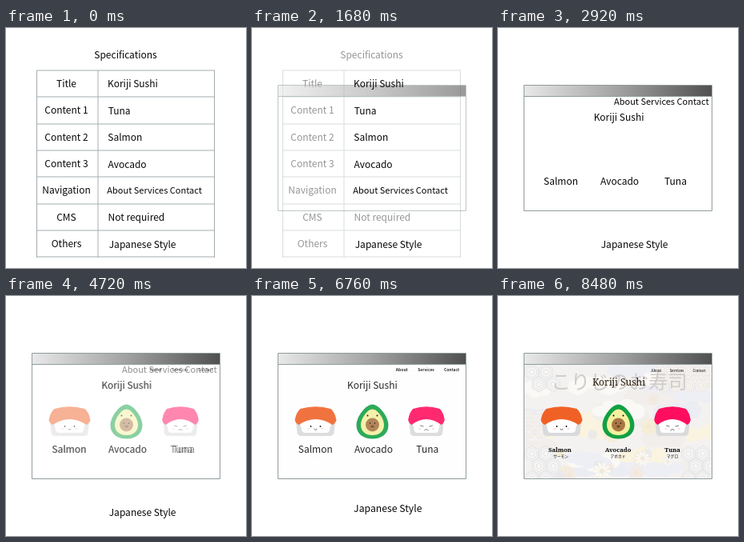
An HTML page that plays this animation: 300 by 300 pixels, repeating every 10 s.

```html
<!DOCTYPE html>
<html lang="en">
<head>
<meta charset="utf-8">
<title>From specification to design</title>
<style>
html, body { margin: 0; width: 100%; height: 100%; overflow: hidden; background: #fff; }
svg { display: block; width: 100%; height: 100%; }
text { font: 12px "Noto Sans CJK JP", "Noto Sans CJK", "Noto Sans", sans-serif; fill: #080808; }
.mid { text-anchor: middle; }
.menu { font-size: 11px; }
.small { font-size: 5px; font-weight: 700; }
.serif { font-family: "Noto Serif", serif; font-weight: 500; }
.title { fill: #2b1e0c; }
.name { font-size: 7.6px; font-weight: 700; }
.link { font-size: 4.5px; }
.kana { font-size: 4.8px; }
.big { font-size: 24.3px; fill: #cfccca; }
</style>
</head>
<body>
<svg viewBox="0 0 300 300" xmlns="http://www.w3.org/2000/svg">
  <defs>
    <linearGradient id="bar">
      <stop offset="0" stop-color="#e8e8e8"/>
      <stop offset=".5" stop-color="#a2a2a2"/>
      <stop offset="1" stop-color="#505050"/>
    </linearGradient>
    <clipPath id="view"><rect x="33" y="86" width="234" height="142"/></clipPath>
    <g id="rice">
      <path d="M-25 15L-23 33Q-22 37-18 37H18Q22 37 23 33L25 15Z" fill="#d9dadb"/>
      <path d="M-21 14L-17 31Q-16 33-13 33H13Q16 33 17 31L21 14Z" fill="#fff"/>
    </g>
    <path id="fish" d="M-26 17Q-24 7-19 3Q0-2.500 19 3Q24 7 26 17Q25 21 21 23Q0 9-21 23Q-25 21-26 17Z"/>
    <g id="dishes">
      <g transform="translate(79.5 138)">
        <use href="#rice"/><use href="#fish" fill="#f06126"/>
        <circle cx="-6" cy="25" r=".9"/><circle cx="6" cy="25" r=".9"/>
        <path d="M-2 28Q0 31 2 28" fill="none" stroke="#333" stroke-width=".8"/>
        <path d="M-10 28h3M7 28h3" stroke="#f8b9b4" stroke-width="1.2"/>
      </g>
      <g transform="translate(150.5 135.5)">
        <path d="M0 0C8 0 20 15 20 26C20 37 11 43 0 43S-20 37-20 26C-20 15-8 0 0 0Z" fill="#12a044"/>
        <path d="M0 6C6 6 14.500 17 14.500 26C14.500 34 8 38.500 0 38.500S-14.500 34-14.500 26C-14.500 17-6 6 0 6Z" fill="#f5f0a0"/>
        <circle cy="25.5" r="8.5" fill="#a97745"/>
        <circle cx="-6" cy="14" r="1"/><circle cx="6" cy="14" r="1"/>
        <circle cx="-3" cy="23.5" r=".8"/><circle cx="3" cy="23.5" r=".8"/>
        <ellipse cy="27.5" rx="2.2" ry="1.5" fill="#6b4526"/>
      </g>
      <g transform="translate(218 138) scale(.88 1)">
        <use href="#rice"/><use href="#fish" fill="#ff0d5e"/>
        <path d="M-9 24l5 1M9 24l-5 1M-3 30Q0 27 3 30" fill="none" stroke="#444" stroke-width=".8"/>
        <path d="M-11 28h3M8 28h3" stroke="#f8b9c4" stroke-width="1.2"/>
      </g>
    </g>
  </defs>

  <g id="table"></g>
  <g id="frame" fill="none" stroke="#919c9e">
    <path d="M33 72H267V85H33Z" fill="url(#bar)" stroke="none"/>
    <path d="M32.5 71.5H267.5V228.5H32.5ZM32.5 85.5H267.5"/>
  </g>
  <g id="plain"></g>
  <g id="draft">
    <use href="#dishes"/>
  </g>
  <g id="styled">
    <g id="pattern" clip-path="url(#view)"></g>
  </g>
  <text id="mood">Japanese Style</text>
</svg>

<script>
const $ = id => document.getElementById(id);
const add = (id, markup) => $(id).insertAdjacentHTML('beforeend', markup);
const label = (x, y, str, cls = '') => `<text x="${x}" y="${y}" class="${cls}">${str}</text>`;
const mids = (y, cls, items) => items.map(([x, s]) => label(x, y, s, 'mid ' + cls)).join('');

const BRAND = 'Koriji Sushi';

// Specification table
const ROW = 33.35;
const rows = ['Title', 'Content 1', 'Content 2', 'Content 3', 'Navigation', 'CMS', 'Others'];
let grid = 'M38.5 53V287M115 53V287M260.5 53V287';
for (let i = 0; i < 8; i++) grid += `M38 ${Math.round(53 + i * ROW)}H261`;
add('table', `<path d="${grid}" fill="none" stroke="#a3adb0"/>` +
  label(149.5, 38, 'Specifications', 'mid') +
  rows.map((s, i) => label(75.5, 74 + i * ROW, s, 'mid')).join('') +
  label(127.5, 240.7, 'Not required'));

// Values that travel into the page: text, from, to, class
const values = [
  [BRAND, 127, 74.4, 119.7, 115.5, ''],
  ['Tuna', 127.7, 107.5, 208, 196.2, ''],
  ['Salmon', 127.3, 140.5, 57, 196.2, ''],
  ['Avocado', 127.5, 174.5, 128, 196.2, ''],
  ['About Services Contact', 126.3, 206.7, 145, 96, 'menu']
];
add('plain', values.map(v => label(v[1], v[2], v[0], v[5])).join(''));
const movers = [...$('plain').children];

add('draft', label(119, 115.5, BRAND) +
  mids(195.7, '', [[79.3, 'Salmon'], [152, 'Avocado'], [219.3, 'Tuna']]) +
  mids(94.3, 'small', [[187.3, 'About'], [217.5, 'Services'], [249.5, 'Contact']]));

// Pale textile backdrop
let seed = 11;
const rnd = () => (seed = seed * 16807 % 2147483647) / 2147483647;
const polar = (x, y, r, a) => `${(x + r * Math.cos(a)).toFixed(1)} ${(y + r * Math.sin(a)).toFixed(1)}`;
const hexagon = (x, y, r) => 'M' + [0, 1, 2, 3, 4, 5]
  .map(k => polar(x, y, r, Math.PI * (k / 3 + 1 / 6))).join('L') + 'Z';

function hexes(x, y, cols, lines) {
  let d = '';
  for (let j = 0; j < lines; j++)
    for (let i = 0; i < cols; i++)
      for (const r of [9.5, 7, 3.5]) d += hexagon(x + (i + j % 2 / 2) * 18, y + j * 15.5, r);
  return `<path d="${d}" fill="#f8f7f6" stroke="#e2e2e4"/>`;
}
function waves(x, y, cols, lines) {
  let s = '';
  for (let j = 0; j < lines; j++)
    for (let i = 0; i < cols; i++)
      for (const r of [8, 5.5, 3])
        s += `<circle cx="${x + (i + j % 2 / 2) * 16}" cy="${y + j * 5}" r="${r}"/>`;
  return `<g fill="#f7f4ee" stroke="#e7e5e8" stroke-width=".9">${s}</g>`;
}
function flower(x, y, r, fill) {
  let s = '';
  for (let k = 0; k < 10; k++)
    s += `<ellipse cx="${r * .6}" rx="${r * .4}" ry="${r * .18}" transform="rotate(${k * 36})"/>`;
  return `<g transform="translate(${x} ${y})" fill="${fill}" stroke="#e9e5e2" stroke-width=".4">${s}` +
    `<circle r="${r * .2}" fill="#f5e9c8"/></g>`;
}
function cloud(x, y, w, fill) {
  let s = '';
  for (let k = 0; k < 5; k++)
    s += `<ellipse cx="${x + (k - 2) * w / 5}" cy="${y + rnd() * 8 - 4}" rx="${w / 5}" ry="${6 + rnd() * 6}"/>`;
  return `<g fill="${fill}">${s}</g>`;
}
let art = '<rect x="33" y="86" width="234" height="142" fill="#f4f2f1"/>';
const tints = ['#ececf3', '#faf3df', '#faf9f6', '#f1eeec', '#eeeff5'];
for (let i = 0; i < 26; i++)
  art += cloud(33 + rnd() * 234, 88 + rnd() * 138, 36 + rnd() * 32, tints[i % 5]);
art += waves(206, 92, 4, 5) + waves(38, 150, 2, 5) + hexes(42, 95, 2, 2) +
  hexes(42, 197, 2, 3) + hexes(238, 197, 2, 3);
const petals = ['#f9efd2', '#f6ebe4', '#fbf9f4', '#e9eaf2'];
for (let i = 0; i < 18; i++)
  art += flower(75 + rnd() * 148, i < 12 ? 194 + rnd() * 32 : 92 + rnd() * 92, 6 + rnd() * 6, petals[i % 4]);
add('pattern', art);

add('styled', label(151.5, 116, 'こりじのお寿司', 'mid big') +
  '<use href="#dishes"/>' + label(151, 111.5, BRAND, 'mid serif title') +
  mids(194.5, 'serif name', [[77.5, 'Salmon'], [150, 'Avocado'], [218, 'Tuna']]) +
  mids(201.5, 'kana', [[78.5, 'サーモン'], [150, 'アボカド'], [218, 'マグロ']]) +
  mids(94.8, 'serif link', [[197.7, 'About'], [223.5, 'Services'], [251.5, 'Contact']]));

// Timeline
const LOOP = 10000, STEP = 40;
const clamp = v => Math.min(1, Math.max(0, v));
const part = (t, a, b) => clamp((t - a) / (b - a));
const ease = p => (1 - Math.cos(Math.PI * p)) / 2;
const mix = (a, b, p) => a + (b - a) * p;
const fade = (id, v) => {
  $(id).style.opacity = v;
  $(id).style.visibility = v > 0 ? 'visible' : 'hidden';
};

function draw(t) {
  const open = part(t, 1080, 2120);
  const move = ease(part(t, 1920, 2920));
  const sketch = part(t, 3600, 5880);
  const style = part(t, 6520, 8480);

  fade('table', 1 - open);
  fade('frame', open);
  fade('plain', clamp(1 - sketch * 1.12));
  fade('draft', sketch * (1 - style));
  fade('styled', style * style);

  movers.forEach((el, i) => {
    const [, x0, y0, x1, y1] = values[i];
    el.setAttribute('x', mix(x0, x1, move));
    el.setAttribute('y', mix(y0, y1, move));
  });

  const go = ease(style);
  const size = mix(1, 1.56, go);
  $('mood').setAttribute('transform',
    `translate(${mix(170.7, 150, go)} ${mix(270.3, 150, go)}) scale(${size}) translate(-42 4.4)`);
  fade('mood', 1 - part(style, .42, .9));
}

const start = performance.now();
function tick() {
  const t = (performance.now() - start) % LOOP;
  draw(Math.floor(t / STEP) * STEP);
  requestAnimationFrame(tick);
}
tick();
</script>
</body>
</html>
```
